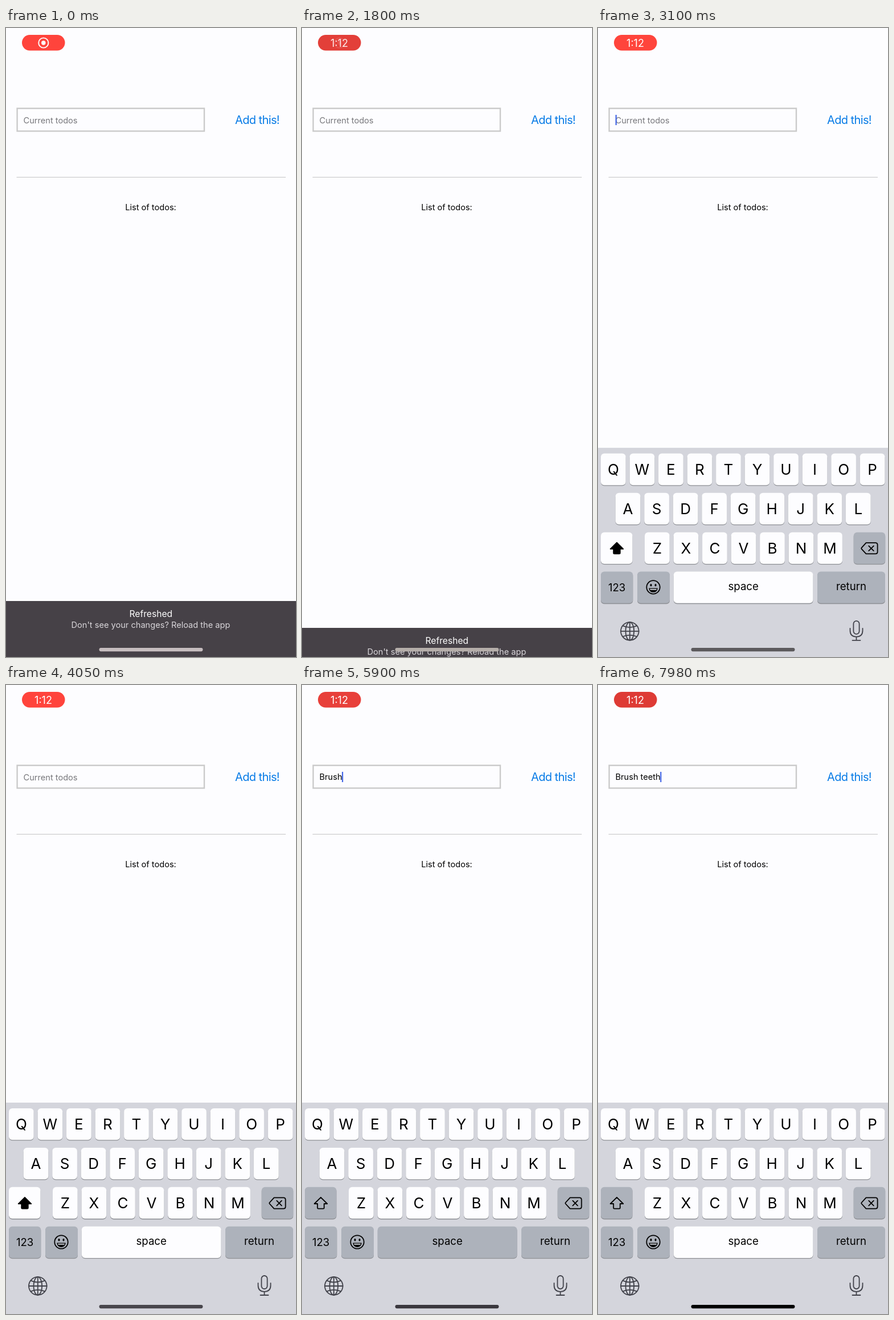
An HTML page for the animation above (8 s loop, 509 by 1101 pixels).

```html
<!DOCTYPE html>
<html lang="en">
<head>
<meta charset="utf-8">
<title>Todo app</title>
<style>
  html, body { margin: 0; width: 100%; height: 100%; overflow: hidden; background: #fdfdff; }
  svg { display: block; width: 100%; height: 100%; }
  text { font-family: Inter, Roboto, sans-serif; font-size: 14.6px; white-space: pre; }
  .mid { text-anchor: middle; }
  .letter { font-size: 26px; }
  .label { font-size: 18.6px; }
  .line { fill: none; stroke: #000; stroke-width: 1.8; stroke-linejoin: round; stroke-linecap: round; }
  .dim { stroke: #41424a; }
</style>
</head>
<body>
<svg id="stage" viewBox="0 0 509 1101">
  <rect width="509" height="1101" fill="#fdfdff"/>

  <rect id="pill" x="28" y="12" width="75.5" height="27.5" rx="13.7"/>
  <g id="record">
    <circle cx="65.8" cy="26" r="8.6" fill="none" stroke="#fff" stroke-width="1.9"/>
    <circle cx="65.8" cy="26" r="3.7" fill="#fff"/>
  </g>
  <text id="clock" class="mid" x="65.5" y="32.5" fill="#fff" style="font-size:18px">1:12</text>

  <rect x="19.6" y="140.7" width="328.4" height="39.8" fill="none" stroke="#cacaca" stroke-width="2.4"/>
  <text id="hint" x="30.5" y="166.5" fill="#77777b">Current todos</text>
  <text id="entry" x="30.5" y="166"></text>
  <rect id="caret" y="152" width="2.2" height="18" fill="#4568e6"/>
  <text class="mid" x="441" y="168" fill="#077be6" style="font-size:20px;letter-spacing:-.6px">Add this!</text>
  <rect x="18.5" y="260.7" width="472.5" height="1.2" fill="#cbcbcd"/>
  <text class="mid" x="254" y="319">List of todos:</text>

  <g id="banner">
    <rect y="1003" width="509" height="98" fill="#464147"/>
    <text class="mid" x="254.3" y="1031" fill="#fff" style="font-size:15.6px">Refreshed</text>
    <text class="mid" x="254" y="1049.5" fill="#d9d6da">Don't see your changes? Reload the app</text>
  </g>

  <g id="keyboard">
    <rect y="731" width="509" height="370" fill="#d4d5dc"/>
    <g id="keys"></g>
    <path id="shift" class="line" d="M33 896.8 L44.3 908 H38.8 V915 Q38.8 916.6 37.2 916.6 H28.8 Q27.2 916.6 27.2 915 V908 H21.7 Z"/>
    <path class="line" d="M470.5 897.3 H487 Q490.6 897.3 490.6 901 V913 Q490.6 916.6 487 916.6 H470.5 L462.6 908 Q461.8 907 462.6 906 Z M475.2 902.7 L483.8 911.3 M483.8 902.7 L475.2 911.3"/>
    <g>
      <circle class="line" cx="97" cy="975" r="11.7" stroke-width="1.6"/>
      <ellipse cx="93" cy="971.3" rx="1.5" ry="2.2"/>
      <ellipse cx="101" cy="971.3" rx="1.5" ry="2.2"/>
      <path d="M89.2 976.6 H104.8 Q103.8 984 97 984 Q90.2 984 89.2 976.6 Z"/>
      <path d="M91 977.8 H103 L102.4 979.8 H91.6 Z" fill="#c9cdd3"/>
    </g>
    <g class="line dim">
      <circle cx="55.8" cy="1052" r="15.8"/>
      <ellipse cx="55.8" cy="1052" rx="7.4" ry="15.8"/>
      <path d="M55.8 1036.2 V1067.8 M40 1052 H71.6 M43.6 1042.6 Q55.8 1048 68 1042.6 M43.6 1061.4 Q55.8 1056 68 1061.4"/>
    </g>
    <g class="line dim">
      <rect x="448.4" y="1034" width="10.2" height="23" rx="5.1"/>
      <path d="M442.5 1047 V1051 Q442.5 1061.8 453.5 1061.8 Q464.5 1061.8 464.5 1051 V1047 M453.5 1061.8 V1068 M446.5 1068 H460.5"/>
    </g>
  </g>

  <rect id="home" x="163.5" y="1085" width="182" height="6.2" rx="3.1"/>
</svg>
<script>
const LOOP = 8000;
const KEY = '#fdfdff', KEY_GRAY = '#adb2bb';
const $ = id => document.getElementById(id);
const keys = $('keys');

function add(tag, attrs, text) {
  const el = document.createElementNS('http://www.w3.org/2000/svg', tag);
  for (const name in attrs) el.setAttribute(name, attrs[name]);
  if (text) el.textContent = text;
  keys.append(el);
  return el;
}

function addKey(x, row, width, fill, text, cls = 'label') {
  const y = 741 + row * 68.9, box = { x, width, height: 55.3, rx: 6 };
  add('rect', { ...box, y: y + 1.3, fill: '#8e9095' });
  const face = add('rect', { ...box, y, fill });
  const base = cls === 'letter' ? 37.3 : text === '123' ? 34.2 : 32.5;
  if (text) add('text', { x: x + width / 2, y: y + base, class: 'mid ' + cls }, text);
  return face;
}

[['QWERTYUIOP', 5], ['ASDFGHJKL', 30.7], ['ZXCVBNM', 82]].forEach(([letters, left], row) => {
  [...letters].forEach((c, i) => addKey(left + i * 50.53, row, 43.7, KEY, c, 'letter'));
});
const shiftKey = addKey(5, 2, 55.5, KEY);
addKey(448.7, 2, 55.5, KEY_GRAY);
addKey(5, 3, 56.3, KEY_GRAY, '123');
addKey(69, 3, 57, KEY_GRAY);
const spaceKey = addKey(132.8, 3, 244.7, KEY, 'space');
addKey(385, 3, 119, KEY_GRAY, 'return');

// Tables of [time, value...]
const PILL = [[0, 255, 68, 60], [1500, 221, 61, 55], [1800, 227, 63, 57], [2500, 255, 69, 60],
  [4100, 255, 68, 60], [5500, 225, 62, 56], [5900, 232, 64, 58], [6600, 255, 69, 60],
  [7200, 250, 67, 59], [8000, 221, 59, 53]];
const HOME = [[0, 198, 189, 191], [1800, 181, 174, 170], [2150, 165, 162, 160], [2540, 105, 104, 106],
  [3100, 92, 90, 93], [4050, 72, 70, 76], [5900, 58, 56, 62], [7400, 12, 12, 13], [7980, 0, 0, 0]];
const TYPING = [4280, 4620, 4960, 5280, 5580, 5960, 6380, 6700, 6960, 7280, 7640];
const PHRASE = 'Brush teeth';
const FOCUS = 2082;

const clamp = v => Math.min(1, Math.max(0, v));
const smooth = v => (1 - Math.cos(Math.PI * clamp(v))) / 2;

function colour(table, t) {
  let i = 0;
  while (i < table.length - 2 && t >= table[i + 1][0]) i++;
  const [a, b] = [table[i], table[i + 1]];
  const k = clamp((t - a[0]) / (b[0] - a[0]));
  return `rgb(${a.slice(1).map((v, n) => Math.round(v + (b[n + 1] - v) * k))})`;
}

// Critically damped spring, from 1 down to 0
function spring(ms) {
  const w = 0.00648 * Math.max(0, ms);
  return (1 + w) * Math.exp(-w);
}

function caretAlpha(t, count) {
  if (t < FOCUS) return 0;
  const since = t - (count ? TYPING[count - 1] : FOCUS);
  const phase = since % 1000;
  return phase < 520 ? 1 : 1 - clamp((phase - 520) / 80) + clamp((phase - 920) / 80) * (count || t < 3600 ? 1 : 0);
}

function draw(t) {
  $('pill').setAttribute('fill', colour(PILL, t));
  $('home').setAttribute('fill', colour(HOME, t));

  const swap = smooth((t - 1250) / 700);
  $('record').setAttribute('opacity', 1 - swap);
  $('clock').setAttribute('opacity', swap);

  $('banner').setAttribute('transform', `translate(0 ${98 * smooth((t - 1460) / 700)})`);
  $('keyboard').setAttribute('transform', `translate(0 ${372 * spring(t - FOCUS)})`);

  const count = TYPING.filter(at => t >= at).length;
  const entry = $('entry');
  entry.textContent = PHRASE.slice(0, count);
  $('hint').setAttribute('visibility', count ? 'hidden' : 'visible');
  $('caret').setAttribute('x', count ? 30 + entry.getComputedTextLength() : 30.6);
  $('caret').setAttribute('opacity', caretAlpha(t, count));

  shiftKey.setAttribute('fill', count ? KEY_GRAY : KEY);
  $('shift').style.fill = count ? 'none' : '#000';
  spaceKey.setAttribute('fill', t >= 5840 && t < 5960 ? KEY_GRAY : KEY);
}

const start = performance.now();
function tick() {
  draw((performance.now() - start) % LOOP);
  requestAnimationFrame(tick);
}
tick();
</script>
</body>
</html>
```
